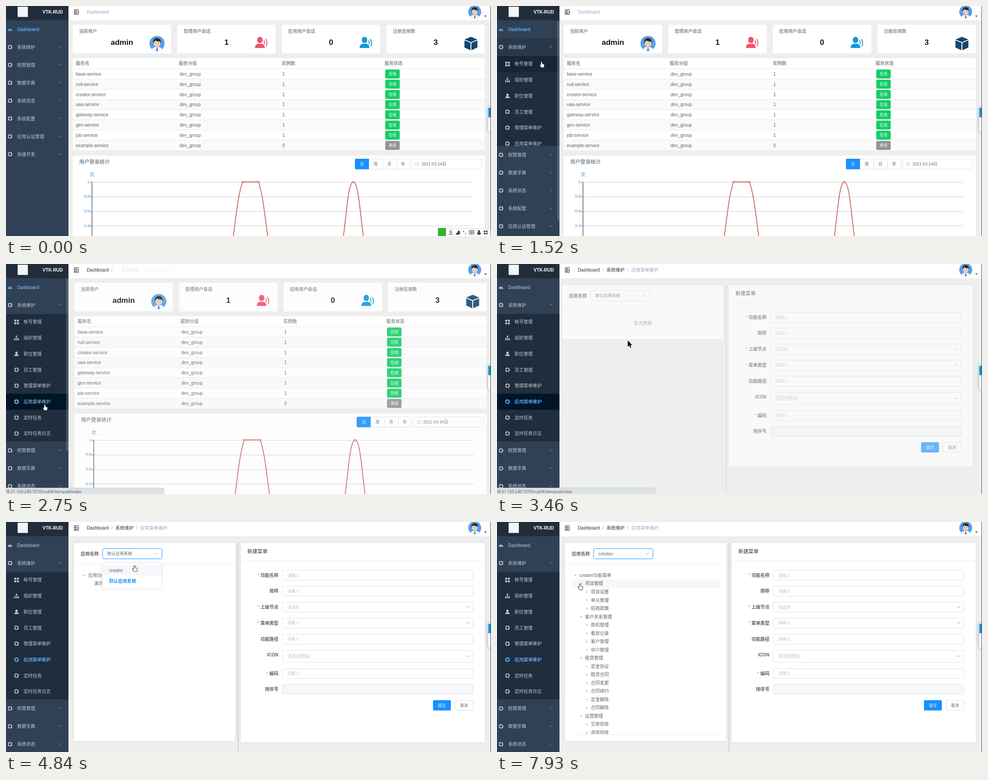
An HTML page with a canvas for the animation above (8000 ms loop, 1087 by 515 pixels).

```html
<!DOCTYPE html>
<html lang="zh-CN">
<head>
<meta charset="utf-8">
<title>Dashboard</title>
<style>
html,body{margin:0;width:100%;height:100%;overflow:hidden}
canvas{display:block}
</style>
</head>
<body>
<canvas id="stage" width="1087" height="515"></canvas>
<script>
const c = document.getElementById('stage').getContext('2d');
const LOOP = 8000, BLUE = '#1890ff', BG = '#edeeee', TEXT = '#606266', PALE = '#bfcbd9';
const SANS = '"Liberation Sans","Noto Sans CJK SC","Noto Sans CJK",sans-serif';
const UI = '"Noto Sans CJK SC","Noto Sans CJK","Open Sans",sans-serif';

// --- timing ---
const OPEN = 1334, CRUMB = 2640, LEAVE = 2690, ENTER = 3220, LOADED = 3800, DROP = 4550, PICK = 5450;
const ramp = (t, start, ms) => Math.min(1, Math.max(0, (t - start) / ms));
function bezier(x, x1, y1, x2, y2) {
  const at = (u, a, b) => 3 * u * (1 - u) * ((1 - u) * a + u * b) + u ** 3;
  let lo = 0, hi = 1;
  for (let i = 0; i < 20; i++) {
    const mid = (lo + hi) / 2;
    at(mid, x1, x2) < x ? lo = mid : hi = mid;
  }
  return at(lo, y1, y2);
}
const ease = x => bezier(x, .25, .1, .25, 1);
const easeInOut = x => bezier(x, .42, 0, .58, 1);

// pointer stops: time, x, y
const PATH = [[130,1080,470],[900,96,95],[1130,105,106],[1280,105,107],[1520,100,125],[2060,90,290],
  [2300,87,315],[2780,87,315],[3460,293,171],[4070,335,130],[4380,296,72],[4540,296,72],[4840,288,98],
  [5380,288,99],[6070,301,111],[6300,301,112],[7000,232,181],[7170,232,181],[7860,186,139],[8000,186,139]];
function pointer(t) {
  const i = PATH.findIndex(p => p[0] > t);
  if (i < 1) return null;
  const [t0, x0, y0] = PATH[i - 1], [t1, x1, y1] = PATH[i];
  const u = (t - t0) / (t1 - t0), k = u * u * (3 - 2 * u);
  return {x: x0 + (x1 - x0) * k, y: y0 + (y1 - y0) * k};
}

// --- drawing helpers ---
function text(s, x, y, color = TEXT, size = 10.1, {bold, align = 'left', font = SANS} = {}) {
  c.font = `${bold ? 'bold ' : ''}${size}px ${font}`;
  c.textAlign = align;
  c.fillStyle = color;
  c.fillText(s, x, y + size * .37);
}
function box(x, y, w, h, fill, r = 0, stroke) {
  c.beginPath();
  c.roundRect(x, y, w, h, r);
  if (fill) { c.fillStyle = fill; c.fill(); }
  if (stroke) { c.strokeStyle = stroke; c.lineWidth = 1; c.stroke(); }
}
function card(x, y, w, h, shadow = 0) {
  c.shadowColor = `rgba(0,0,0,${shadow})`;
  c.shadowBlur = 6;
  box(x, y, w, h, '#fff', 2);
  c.shadowBlur = 0;
  c.shadowColor = 'transparent';
}
function disc(x, y, r, fill) {
  c.beginPath();
  c.arc(x, y, r, 0, 7);
  c.fillStyle = fill;
  c.fill();
}
function stroke(d, color, width = 1) {
  c.strokeStyle = color;
  c.lineWidth = width;
  c.stroke(new Path2D(d));
}
function shape(d, fill) {
  c.fillStyle = fill;
  c.fill(new Path2D(d));
}
function at(x, y, draw) {
  c.save();
  c.translate(x, y);
  draw();
  c.restore();
}
const chevron = (x, y, color, turn = 0, s = 1) => at(x, y, () => {
  c.rotate(Math.PI * turn);
  c.scale(s, s);
  stroke('M-3 -1.5L0 1.5L3 -1.5', color);
});

function avatar(x, y, r) {
  at(x, y, () => {
    c.scale(r / 15, r / 15);
    disc(0, 0, 15, '#5a9fe6');
    c.clip();
    shape('M-11 15Q-10 7 0 6Q10 7 11 15Z', '#f4f7fb');
    shape('M-2.5 4h5v4l-2.5 2l-2.5 -2Z', '#edbd9c');
    shape('M-1 9h2l1 6h-4Z', '#3f78c8');
    box(-6.5, -7, 13, 13, '#f8d8c0', 6);
    shape('M-7.5 0Q-9 -10 0 -11Q9 -10 7.5 0L6 -4Q0 -3 -3 -6Q-6 -4 -7.5 0Z', '#2a2b33');
    disc(-2.6, -.5, .8, '#333');
    disc(2.6, -.5, .8, '#333');
    stroke('M-1.6 3Q0 4 1.6 3', '#b56d5a', .7);
  });
}
function visitor(x, y, color) {
  at(x, y, () => {
    box(-9, -12, 12, 14, color, 6);
    shape('M-14 13Q-14 5 -6 3Q-3 5 0 3Q8 5 8 13Z', color);
    stroke('M6 -4Q9 1 6.5 5M10 -7Q15 1 11.5 9', color, 2);
  });
}
function cube(x, y) {
  at(x, y, () => {
    shape('M0 -15L14.5 -9L0 -3L-14.5 -9ZM-14.5 -7L-1 -1.5V15L-14.5 9ZM14.5 -7L1 -1.5V15L14.5 9Z', '#12476f');
  });
}

// --- sidebar ---
const MENU = ['Dashboard','系统维护','权限管理','数据字典','系统状态','系统配置','应用认证管理','快速开发'];
const SUB = ['帐号管理','组织管理','职位管理','员工管理','管理菜单维护','应用菜单维护','定时任务','定时任务日志'];
const SUB_H = 35.7, ACTIVE = 5;
const ICONS = {
  gauge: col => {
    shape('M-5 3.5A5 5 0 1 1 5 3.5Z', col);
    stroke('M0 2L2 -2M-3.5 1h1M2.5 1h1M-2.5 -2l.7 .7', '#304156', .9);
  },
  grid: col => [[-5,-5],[1,-5],[-5,1],[1,1]].forEach(([x, y]) => box(x, y, 4.2, 4.2, col, .5)),
  tree: col => {
    shape('M-1.5 -5h3v3h-3ZM-5.5 2h3v3h-3ZM-1.5 2h3v3h-3ZM2.5 2h3v3h-3Z', col);
    stroke('M0 -2V2M-4 2V0H4V2', col, .8);
  },
  person: col => {
    disc(0, -2.2, 2.7, col);
    shape('M-5 5Q-5 1 0 1Q5 1 5 5Z', col);
  },
  ring: col => {
    const quarter = 3.9 * Math.PI / 2, gap = .8;
    c.setLineDash([quarter - gap, gap]);
    c.beginPath();
    c.arc(0, 0, 3.9, .1, .1 + Math.PI * 2);
    c.strokeStyle = col;
    c.lineWidth = 2.2;
    c.stroke();
    c.setLineDash([]);
  }
};
function entry(label, icon, x, y, gap, lit) {
  const paint = col => {
    at(x, y, () => ICONS[icon](col));
    text(label, x + gap, y, col);
  };
  paint(PALE);
  if (lit) {
    c.globalAlpha = lit;
    paint('#409eff');
    c.globalAlpha = 1;
  }
}
function sidebar(t, p) {
  const h = SUB.length * SUB_H * easeInOut(ramp(t, OPEN, 300));
  const inside = p && p.x < 140, moved = ramp(t, LEAVE, 300);
  box(0, 0, 140, 515, '#304156');
  c.globalAlpha = ramp(t, 800, 150) * (1 - ramp(t, 1440, 300));
  box(0, 72, 140, 40, '#263445');
  c.globalAlpha = 1;
  MENU.forEach((label, i) => {
    const y = 52 + i * 40 + (i > 1 ? h : 0);
    entry(label, i ? 'ring' : 'gauge', 9, y, 16, i ? 0 : 1 - moved);
    if (i) chevron(121, y - .5, '#8493a6', i === 1 ? ramp(t, OPEN, 300) : 0);
  });
  if (h) {
    c.save();
    c.beginPath();
    c.rect(0, 112, 140, h);
    c.clip();
    box(0, 112, 140, h, '#1f2d3d');
    const row = t > LEAVE ? ACTIVE : inside ? Math.floor((p.y - 112) / SUB_H) : -1;
    if (row >= 0) {
      c.globalAlpha = t > LEAVE ? 1 - ramp(t, 3500, 300) : ramp(t, 1440, 300);
      box(0, 112 + row * SUB_H, 140, SUB_H, '#001528');
      c.globalAlpha = 1;
    }
    SUB.forEach((label, i) => entry(label, ['grid','tree','person'][i] || 'ring', 23.5,
      129.7 + i * SUB_H, 16, i === ACTIVE ? moved : 0));
    c.restore();
  }
  const content = MENU.length * 40 + h;
  if (inside && content > 483) box(135, 33, 4.5, 483 * 483 / content, 'rgba(144,147,153,.4)', 2);
  box(0, 0, 140, 32, '#212d3b');
  box(26, 1.5, 23, 23, '#f2f4f6');
  text('VTK-RUD', 82, 13.5, '#fff', 10.1, {bold: true});
}

// --- header ---
function header(t) {
  box(140, 0, 947, 32, '#fff');
  stroke('M152 8.7h11M152 12h7M152 15.2h7M152 18h11', '#222', 1.3);
  shape('M163 11v5l-3 -2.5Z', '#222');
  if (t < CRUMB) text('Dashboard', 181, 13.5, '#97a8be');
  else {
    const k = ease(ramp(t, CRUMB, 500)), dx = 20 * (1 - k);
    text('Dashboard', 181, 13.5, '#303133');
    text('/', 236, 13.5, '#a0a6b0');
    c.globalAlpha = k * k;
    text('系统维护', 245.5 + dx, 13.5, '#303133');
    text('/', 291.5 + dx, 13.5, '#a0a6b0');
    text('应用菜单维护', 301 + dx, 13.5, '#97a8be');
    c.globalAlpha = 1;
  }
  avatar(1050.5, 13, 14.5);
  shape('M1071.5 21.5h6l-3 3Z', '#444');
}

// --- dashboard page ---
const SERVICES = ['base','rud','creator','uaa','gateway','gen','job','example'];
function dashboard() {
  [['当前用户','admin'],['管理用户会话','1'],['应用用户会话','0'],['注册应用数','3']].forEach(([name, value], i) => {
    const x = 149.5 + i * 234.4;
    card(x, 42, 220.5, 64);
    text(name, x + 14, 56, '#8c8f95', 10.1, {bold: true});
    text(value, x + 110.3, 81, '#111', 17, {bold: true, align: 'center'});
  });
  avatar(338.5, 84, 17);
  visitor(572, 81, '#f4516c');
  visitor(806.5, 81, '#1296db');
  cube(1042, 84);

  card(149.5, 117, 923.5, 206);
  ['服务名','服务分组','实例数','服务状态'].forEach((s, i) =>
    text(s, 156.5 + i * 230.7, 128.5, '#8c8f95', 10.1, {bold: true}));
  SERVICES.forEach((s, i) => {
    const y = 152.2 + i * 22.85, on = i < 7;
    if (i % 2) box(149.5, y - 11.4, 923.5, 22.8, '#fafafa');
    box(149.5, Math.round(y - 12), 923.5, 1, '#e6e9ef');
    text(s + '-service', 156.5, y);
    text('dev_group', 389, y);
    text(on ? '1' : '0', 619.5, y);
    box(850, y - 10, 32.5, 20, on ? '#13ce66' : '#909399', 3);
    text(on ? '在线' : '离线', 866.3, y, '#fff', 8.6, {align: 'center'});
  });

  card(149.5, 335, 923.5, 200);
  text('用户登录统计', 164, 349, '#8c8f95', 11.4, {bold: true});
  box(782.5, 342.5, 123, 23, '#fff', 3, '#dcdfe6');
  box(782, 342, 31.5, 23.5, BLUE, [3, 0, 0, 3]);
  [...'日周月年'].forEach((s, i) => {
    text(s, 798 + i * 30.6, 354, i ? TEXT : '#fff', 8.8, {align: 'center'});
    if (i > 1) box(782 + i * 31, 343, 1, 22, '#dcdfe6');
  });
  box(909.5, 342.5, 156.5, 23, '#fff', 3, '#dcdfe6');
  stroke('M918 351h7v6.5h-7ZM918 353h7M920 349.5v2M923 349.5v2', '#c0c4cc', .8);
  text('2021-03-14日', 931, 354, TEXT, 9.1, {font: UI});

  text('次', 187.5, 377, BLUE, 10.5);
  ['1','0.8','0.6','0.4'].forEach((s, i) => {
    const y = 394 + i * 32.8;
    box(193, Math.round(y), 852, 1, '#ccc');
    box(188, Math.round(y), 5, 1, '#555');
    text(s, 187, y - .5, BLUE, 8.6, {align: 'right'});
  });
  box(192, 394, 1.4, 121, '#555');
  // both humps rise from the zero line at y 558
  stroke('M494.5 558C512 558 512 448 530 394H566C584 448 584 558 601.5 558', '#c23531', 1.4);
  stroke('M743 558C761 558 761 394 778.5 394C796 394 796 558 814 558', '#c23531', 1.4);
  for (const x of [530, 566, 778.5]) {
    disc(x, 394, 2.2, '#c23531');
    disc(x, 394, 1.3, '#fff');
  }
}

// --- menu editor page ---
const TREE_A = '0应用功能菜单|-演示功能'.split('|');
const TREE_B = ('0creater功能菜单|1项目管理|2项目设置|2单元管理|2招商政策|1客户关系管理|2商机管理|2看房记录|2客户管理|' +
  '2中介管理|1租赁管理|2定金协议|2租赁合同|2合同变更|2合同续约|2定金解除|2合同解除|1运营管理|2交房验收|2退房验收').split('|');
// label, centre y, placeholder, required, select
const FIELDS = [['功能名称',119.5,'请输入',1],['简称',154.5,'请输入'],['上级节点',190.5,'请选择',1,1],['菜单类型',226,'请输入',1,1],
  ['功能路径',262,'请输入'],['ICON',300.5,'请选择图标',0,1],['编码',339,'请输入',1],['排序号',374.5,'']];
const ROW = 18.53;

function tree(rows, p, hover) {
  c.save();
  c.beginPath();
  c.rect(160, 100, 345, 375);
  c.clip();
  const over = hover && p.x > 167 && p.x < 500 ? Math.floor((p.y - 109.7) / ROW) : -1;
  rows.forEach((s, i) => {
    const kind = s[0], depth = kind === '-' ? 1 : +kind, x = 184.3 + depth * 13, y = 119.2 + i * ROW;
    if (i === over) box(167, y - 9.3, 333, ROW, '#f5f7fa');
    if (kind !== '-') at(x - 8.5, y + .5, () => {
      if (depth === 2) c.rotate(-Math.PI / 2);
      shape('M-3 -1.7h6l-3 3.6Z', '#c0c4cc');
    });
    text(s.slice(1), x, y);
  });
  c.restore();
}
function dropdown(k) {
  at(0, 92, () => {
    c.globalAlpha = k;
    c.scale(1, k);
    c.translate(0, -92);
    card(216, 92, 133.5, 58, .1);
    box(216, 92, 133.5, 58, '#fff', 3, '#e4e7ed');
    shape('M242 92.5l4 -4l4 4Z', '#fff');
    stroke('M242 92l4 -4l4 4', '#e4e7ed');
    box(216.5, 96, 132.5, 24, '#f5f7fa');
    text('creator', 231, 108);
    text('默认应用系统', 231, 132, BLUE, 10.1, {bold: true});
  });
}
function editor(t, p) {
  const loaded = t > LOADED, picked = t > PICK;
  const open = ease(ramp(t, DROP, 250)) * (1 - ease(ramp(t, PICK, 250)));
  card(152.5, 47, 361.5, loaded ? 443.5 : 121.5, .08);
  text('应用名称', 167.5, 71, TEXT, 10.1, {bold: true});
  box(216.5, 59.5, 133, 23, '#fff', 3, t > DROP ? BLUE : '#dcdfe6');
  text(picked ? 'creator' : '默认应用系统', 227, 71, TEXT, picked ? 10 : 9.3, {font: UI});
  chevron(337, 71, '#c0c4cc', open, 1.15);
  box(152.5, 95, 361.5, 1, '#ebeef5');
  if (!loaded) text('暂无数据', 333.3, 132, '#909399', 10.1, {align: 'center'});
  else tree(t > PICK + 150 ? TREE_B : TREE_A, p, open < .05);
  if (t > PICK + 150) box(167, 475, 333, 1, '#e4e7ed');
  box(519.5, 47, 1.5, 470, '#c4c6c9');

  card(526, 47, 547, loaded ? 446.5 : 406.5, .08);
  text('新建菜单', 541, 66, '#303133', 11.3);
  box(526, 86, 547, 1, '#ebeef5');
  for (const [label, y, hint, needed, select] of FIELDS) {
    const icon = label === 'ICON', h = icon ? 28 : 23;
    text(label, 610.5, icon ? 297.5 : y, TEXT, 10.1, {bold: true, align: 'right'});
    if (needed) text('*', 610.5 - label.length * 10.1 - 3, y, '#f56c6c', 10.1, {align: 'right'});
    box(619.5, Math.round(y - h / 2) + .5, 427, h - 1, hint ? '#fff' : '#f5f7fa', 3, '#dcdfe6');
    text(hint, 630.5, y, '#c0c4cc', icon ? 10.1 : 9.1);
    if (select) chevron(1034.5, y, '#c0c4cc', 0, 1.15);
  }
  box(957, 399, 40, 23, BLUE, 2);
  text('提交', 977, 411, '#fff', 8.7, {align: 'center'});
  box(1006.5, 399.5, 40, 22, '#fff', 2, '#dcdfe6');
  text('取消', 1026.5, 411, TEXT, 8.7, {align: 'center'});
  if (open > 0) dropdown(open);
}

// slide a page sideways and fade it into the flat background
function page(draw, dx, fade) {
  at(dx, 0, draw);
  c.globalAlpha = fade;
  box(140, 32, 947, 483, BG);
  c.globalAlpha = 1;
}

// --- overlays ---
function inputBar() {
  box(986, 498.5, 100, 18, '#fff', 2, '#d5d5d5');
  box(968, 497, 18, 18, '#2fb52f');
  text('五', 991.5, 507, '#333', 10.5);
  shape('M1013 502.5A5 5 0 1 1 1008 509A5.5 5.5 0 0 0 1013 502.5Z', '#3a4254');
  disc(1025.5, 505, 1.2, '#3a4254');
  text(',', 1028, 506, '#3a4254', 11, {bold: true});
  box(1038, 502.5, 11, 8.5, null, 1, '#3a4254');
  stroke('M1039.5 505h8M1039.5 507h8M1041 509h5', '#3a4254', 1);
  disc(1060, 504.5, 2.5, '#3a4254');
  box(1056, 507, 8, 5, '#3a4254', 2);
  for (const [x, y] of [[0, 0], [5, 0], [0, 5], [5, 5]]) disc(1072.5 + x, 504.5 + y, 2.1, '#3a4254');
}
function statusBar(t) {
  c.globalAlpha = ramp(t, 2100, 100) * (1 - ramp(t, 3650, 150));
  box(-2, 501.5, 356, 16, '#dee1e6', 3, '#c5c9ce');
  text('98.51.100.240:7070/rud/#/itempad/index', 169, 509.5, '#555', 8.9,
    {align: 'right', font: '"Open Sans","Noto Sans",sans-serif'});
  c.globalAlpha = 1;
}
function edgeTab() {
  card(1080.5, 227, 8, 54, .35);
  box(1081, 228, 5, 21, '#1296db');
  box(1086, 0, 1, 515, '#3a3a3a');
}
const HAND = 'M-1.3 1Q0 -1 1.3 1V4.6L4.6 5.4Q6 5.8 6 7.5L5 12.5H-1L-4 8Q-4.4 6 -2.8 6.4L-1.3 7.6Z';
const ARROW = 'M0 0V14.5L3.4 11.4L5.8 16.8L8 15.8L5.7 10.6H10Z';
function cursor(t, p) {
  at(p.x, p.y, () => {
    const hand = p.x < 140 || t > 4070, d = hand ? HAND : ARROW;
    stroke(d, hand ? '#000' : '#fff', hand ? 1.6 : 1.5);
    shape(d, hand ? '#fff' : '#000');
  });
}

function frame() {
  const t = performance.now() % LOOP, p = pointer(t);
  box(0, 0, 1087, 515, BG);
  if (t < ENTER) {
    const k = ease(ramp(t, LEAVE, 500));
    page(dashboard, 30 * k, k);
  } else {
    const k = ease(ramp(t, ENTER, 500));
    page(() => editor(t, p), -30 * (1 - k), 1 - k * k);
  }
  header(t);
  sidebar(t, p);
  edgeTab();
  statusBar(t);
  if (t < 1300) inputBar();
  if (p) cursor(t, p);
  requestAnimationFrame(frame);
}
frame();
</script>
</body>
</html>
```
